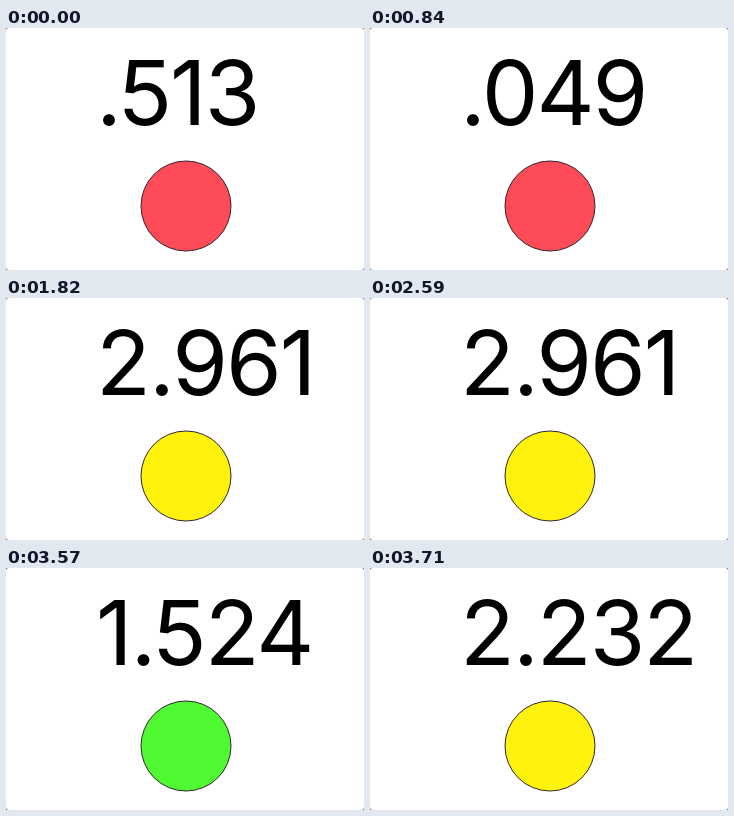
Write an HTML page that moves like this. It is 358 by 242 pixels and loops after 3.99 s.

```html
<!DOCTYPE html>
<html lang="en">
<head>
<meta charset="utf-8">
<title>Reaction timer</title>
<style>
  html, body { margin: 0; width: 100%; height: 100%; overflow: hidden; background: #777; }
  svg { display: block; width: 358px; height: 242px; }
  text { font: 400 90px Inter, "Liberation Sans", sans-serif; letter-spacing: -2px; }
</style>
</head>
<body>
<svg viewBox="0 0 358 242">
  <rect width="358" height="242" rx="3" fill="#fff"/>
  <text id="time" x="90" y="97"></text>
  <circle id="light" cx="180" cy="178" r="45" stroke="#33262f"/>
</svg>
<script>
  const LOOP = 3990;
  const RED = '#fd4b57', YELLOW = '#fff30d', GREEN = '#4ffa33';
  // start in ms, reading, light colour
  const states = [
    [0, '.513', RED],
    [840, '.049', RED],
    [1820, '2.961', YELLOW],
    [2660, '1.524', GREEN],
    [3640, '2.232', YELLOW]
  ];
  const time = document.getElementById('time');
  const light = document.getElementById('light');
  const begin = performance.now();

  function draw() {
    const t = (performance.now() - begin) % LOOP;
    const [, reading, colour] = states.findLast(([start]) => start <= t);
    time.textContent = reading;
    light.setAttribute('fill', colour);
    requestAnimationFrame(draw);
  }
  draw();
</script>
</body>
</html>
```
